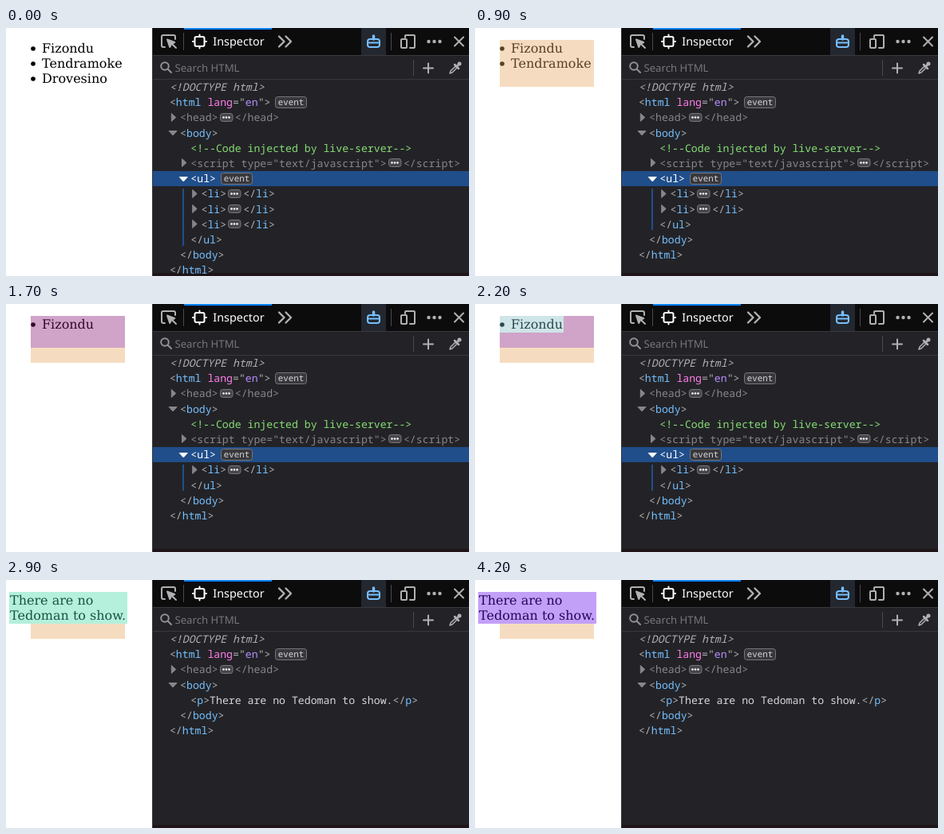
An HTML page for the animation above (4.3 s loop, 580 px wide and 312 px high).

```html
<!DOCTYPE html>
<html lang="en">
<head>
<meta charset="utf-8">
<title>List inspector</title>
<style>
html, body { margin: 0; width: 100%; height: 100%; overflow: hidden; background: #fff; }
svg { display: block; width: 580px; height: 312px; }
text { white-space: pre; text-rendering: geometricPrecision; }

.page text { font: 16px "DejaVu Serif", serif; }
.ui text { font: 13.2px "Noto Sans", sans-serif; }
.tree text { font: 13.2px "Noto Sans Mono", monospace; }
.tree .badge { font-size: 10.8px; fill: #d7d7db; }
.icon { fill: none; stroke: #b1b1b3; stroke-width: 2; stroke-linecap: round; stroke-linejoin: round; }

.b { fill: #b1b1b3; }
.t { fill: #75bfff; }
.a { fill: #ff7de9; }
.v { fill: #b98eff; }
.c { fill: #86de74; }
.m { fill: #87878b; }
.x { fill: #d7d7db; }
.w { fill: #fff; }
.i { font-style: italic; }

/* every layer switches hard within one 4.3 s loop */
.s { animation: 4.3s step-end infinite; }
.to900 { animation-name: to900; }
.to1600 { animation-name: to1600; }
.to2300 { animation-name: to2300; }
.two { animation-name: two; }
.one { animation-name: one; }
.from900 { animation-name: from900; }
.from2300 { animation-name: from2300; }
.teal { animation-name: teal; }
.glow { animation-name: glow; }
.paint { animation-name: paint; }
.ink { animation-name: ink; }
.note { animation-name: note; }
.noteink { animation-name: noteink; }

@keyframes to900 { 0% { visibility: visible } 20.93%, 100% { visibility: hidden } }
@keyframes to1600 { 0% { visibility: visible } 37.209%, 100% { visibility: hidden } }
@keyframes to2300 { 0% { visibility: visible } 53.488%, 100% { visibility: hidden } }
@keyframes two { 0% { visibility: hidden } 20.93% { visibility: visible } 39.534%, 100% { visibility: hidden } }
@keyframes one { 0% { visibility: hidden } 39.534% { visibility: visible } 53.488%, 100% { visibility: hidden } }
@keyframes from900 { 0% { visibility: hidden } 20.93%, 100% { visibility: visible } }
@keyframes from2300 { 0% { visibility: hidden } 53.488%, 100% { visibility: visible } }
@keyframes teal { 0% { visibility: hidden } 51.162% { visibility: visible } 53.488%, 100% { visibility: hidden } }
@keyframes glow { 0% { visibility: hidden } 53.488% { visibility: visible } 67.441%, 100% { visibility: hidden } }
@keyframes paint {
  0% { fill: #fff }
  20.93% { fill: #f5dcc0 }
  34.883% { fill: #e2a9b9 }
  37.209%, 100% { fill: #d0a3c8 }
}
@keyframes ink {
  0% { fill: #000 }
  20.93% { fill: #594024 }
  34.883% { fill: #460d1d }
  37.209% { fill: #34072c }
  51.162%, 100% { fill: #2c484c }
}
@keyframes note { 0% { fill: #b4f0dc } 97.674%, 100% { fill: #c3a0f8 } }
@keyframes noteink { 0% { fill: #185440 } 97.674%, 100% { fill: #27045c } }
</style>
</head>
<body>
<svg viewBox="0 0 580 312">
  <rect width="580" height="312" fill="#fff"/>

  <g class="page">
    <rect class="s from900" x="31" y="54" width="118" height="20" fill="#f5dcc0"/>
    <g class="s to2300">
      <rect class="s paint" x="31" y="15" width="118" height="40"/>
    </g>
    <rect class="s teal" x="31" y="15" width="80" height="21" fill="#cfe5e8"/>
    <g class="s to2300"><g class="s ink"><circle cx="34" cy="26" r="2.800"/><text x="45" y="31">Fizondu</text></g></g>
    <g class="s to1600"><g class="s ink"><circle cx="34" cy="45" r="2.800"/><text x="45" y="50">Tendramoke</text></g></g>
    <g class="s to900"><circle cx="34" cy="64" r="2.800"/><text x="45" y="69">Drovesino</text></g>
    <g class="s from2300">
      <rect class="s note" x="4" y="15" width="148" height="40"/>
      <g class="s noteink"><text x="5" y="31">There are no</text><text x="5" y="50">Tedoman to show.</text></g>
    </g>
  </g>

  <g class="ui">
    <rect x="183" width="397" height="312" fill="#232327"/>
    <rect x="183" width="397" height="34" fill="#0c0c0d"/>
    <path d="M183 34.5H580M183 64.5H580M183.5 0V312" stroke="#38383d"/>
    <rect x="184" y="308" width="396" height="4" fill="#1f1519"/>
    <rect x="223" width="110" height="2" fill="#0a84ff"/>
    <rect x="445" width="31" height="34" fill="#23272f"/>
    <path d="M222.500 6V28M482.500 6V28M510.500 40V60" stroke="#4a4a4f"/>

    <g class="icon">
      <path d="M199 24h-2q-2 0-2-2V11q0-2 2-2h13q2 0 2 2v3"/>
      <path d="M202 14.500l3.200 9.500 2-4 4-2z" fill="#b1b1b3"/>
      <path d="M208.500 20.500l4.500 4.500"/>
      <g stroke="#fff">
        <rect x="236.500" y="11" width="12" height="12" rx="2"/>
        <path d="M242.500 8.500v2M242.500 23.500v2M234 17h2M249 17h2"/>
      </g>
      <path d="M342 10.500l6.500 6.500-6.500 6.500M350.500 10.500l6.500 6.500-6.500 6.500" stroke-width="2.400"/>
      <g stroke="#75bfff">
        <path d="M460.500 10v4" stroke-width="3.500"/>
        <rect x="453" y="14" width="15" height="10" rx="3"/>
        <path d="M453 18.500h15"/>
      </g>
      <path d="M500 12V10q0-1 1-1h10q1 0 1 1v14q0 1-1 1h-5"/>
      <rect x="495" y="14" width="7" height="11" rx="1"/>
      <path d="M562 11.500l11 11M573 11.500l-11 11"/>
      <circle cx="199" cy="48" r="4.800" stroke="#939395"/>
      <path d="M203 52l4 4" stroke="#939395"/>
      <path d="M523 50.500h12M529 44.500v12"/>
      <path d="M556 57l1-3 6-6 2 2-6 6z" stroke-width="1.500"/>
      <path d="M562 46l5 5M565.500 47.500l2.500-2.500" stroke-width="2.500"/>
      <circle cx="568" cy="45" r="1.500"/>
    </g>
    <g fill="#b1b1b3"><circle cx="529.500" cy="17" r="2.200"/><circle cx="536.500" cy="17" r="2.200"/><circle cx="543.500" cy="17" r="2.200"/></g>
    <text x="259.300" y="22" style="font-size:14.4px" fill="#fff">Inspector</text>
    <text x="211.400" y="55" fill="#76767a">Search HTML</text>
  </g>

  <g class="tree" id="tree"></g>
</svg>

<script>
// rows snap to whole pixels; one indent step equals the font size
const rowY = k => Math.floor(64.9 + 19.2 * k);
const baseY = k => Math.floor(79.4 + 19.2 * k);
const indent = d => 204.9 + 13.2 * d;
const charW = 7.92;

const esc = s => s.replace(/&/g, '&amp;').replace(/</g, '&lt;');
const span = (cls, s) => `<tspan class="${cls}">${esc(s)}</tspan>`;
const textAt = (k, x, body) => `<text x="${x.toFixed(2)}" y="${baseY(k)}">${body}</text>`;
const row = (k, depth, body) => textAt(k, indent(depth), body);
const layer = (cls, body) => `<g class="s ${cls}">${body}</g>`;

const tag = (name, t = 't', b = 'b') => span(b, '<') + span(t, name) + span(b, '>');
const end = (name, t = 't', b = 'b') => span(b, '</') + span(t, name) + span(b, '>');

function arrow(k, depth, open, fill = '#87878b') {
  const x = indent(depth) - (open ? 9 : 8.3), y = rowY(k) + 9.5;
  const d = open ? `M${x - 5} ${y - 2}h10l-5 5.5z` : `M${x - 2.5} ${y - 5}v10l5.5 -5z`;
  return `<path d="${d}" fill="${fill}" stroke="${fill}" stroke-linejoin="round"/>`;
}

function pill(k, x) {
  const y = rowY(k) + 9.5;
  const dots = [4.5, 8, 11.5].map(d => `<circle cx="${x + d}" cy="${y}" r="1.3" fill="#fff"/>`).join('');
  return `<rect x="${x + .5}" y="${y - 5}" width="15.5" height="10" rx="3" fill="#46464b" stroke="#77777b"/>` + dots;
}

// collapsed element: arrow, opening tag, pill, closing tag
function folded(k, depth, name, attrs = '', t = 'm', b = 'm') {
  const x = indent(depth) + charW * (name.length + attrs.length + 2);
  return arrow(k, depth, false) + row(k, depth, span(b, '<') + span(t, name) + span(b, attrs + '>')) +
    pill(k, Math.floor(x + 2.4)) + textAt(k, x + 21.1, end(name, t, b));
}

function badge(k, x) {
  const y = rowY(k);
  return `<rect x="${x + .5}" y="${y + 2.5}" width="39" height="14" rx="3" fill="#38383d" stroke="#77777b"/>` +
    `<text class="badge" x="${x + 3.8}" y="${y + 13}">event</text>`;
}

const band = (k, n, fill) =>
  `<rect x="184" y="${rowY(k)}" width="396" height="${rowY(k + n) - rowY(k)}" fill="${fill}"/>`;

const closing = k => row(k, 1, end('body')) + row(k + 1, 0, end('html'));

const head =
  row(0, 0, span('b i', '<!DOCTYPE html>')) +
  row(1, 0, span('b', '<') + span('t', 'html') + span('a', ' lang') + span('b', '="') +
    span('v', 'en') + span('b', '">')) + badge(1, 337) +
  folded(2, 1, 'head') +
  arrow(3, 1, true) + row(3, 1, tag('body'));

const listTop =
  row(4, 2, span('c', '<!--Code injected by live-server-->')) +
  folded(5, 2, 'script', ' type="text/javascript"') +
  band(6, 1, '#204e8a') + arrow(6, 2, true, '#fff') +
  row(6, 2, tag('ul', 'w', 'w')) + badge(6, 269);

function items(n) {
  let s = `<rect x="221" y="${rowY(7) + 3}" width="2" height="${rowY(8 + n) - rowY(7) - 5}" fill="#204e8a"/>`;
  for (let k = 7; k < 7 + n; k++) s += folded(k, 3, 'li', '', 't', 'b');
  return s + row(7 + n, 2, end('ul')) + closing(8 + n);
}

const message = (...cls) =>
  row(4, 2, tag('p', ...cls) + span('x', 'There are no Tedoman to show.') + end('p', ...cls));

document.getElementById('tree').innerHTML =
  head +
  layer('to2300', listTop) +
  layer('to900', items(3)) +
  layer('two', items(2)) +
  layer('one', items(1)) +
  layer('from2300', message() + closing(5)) +
  layer('glow', band(3, 2, '#50491f') + arrow(3, 1, true) +
    row(3, 1, tag('body', 'w', 'w')) + message('w', 'w'));
</script>
</body>
</html>
```
